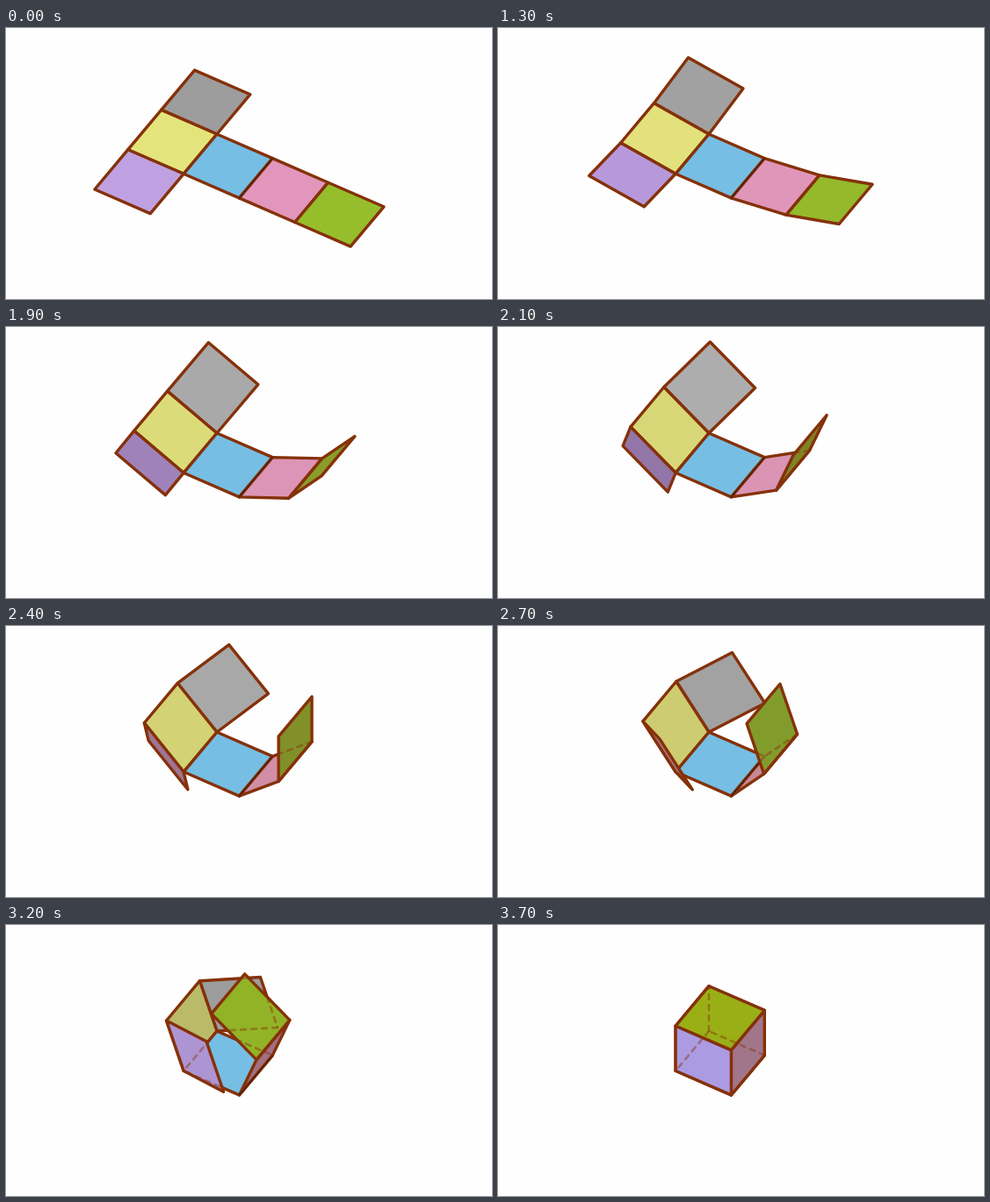
These frames come from a looping animation (553 px wide and 309 px high, 5 s). An HTML page with a canvas:

```html
<!DOCTYPE html>
<html lang="en">
<head>
<meta charset="utf-8">
<title>Folding cube net</title>
<style>
  html, body { margin: 0; width: 100%; height: 100%; overflow: hidden; background: #fefefe; }
  canvas { display: block; }
</style>
</head>
<body>
<canvas id="stage" width="553" height="309"></canvas>
<script>
const ctx = document.getElementById('stage').getContext('2d');
const LOOP = 5000;
const STEPS = [1300, 1700, 1900, 2100, 2400, 2700, 2900, 3200, 3400, 3700];
const EDGE = '#85310a';

// Projected cube axes and the back corner of the base
const U = [63.3, 27.6], V = [-37.9, 45.3], W = [0, -51.3];
const A = [240, 121];

// Face colours keyed by fold step, blended in between
const COLORS = {
  gray:   { 0: '9d9d9d', 2: 'a5a5a5', 4: 'adadad', 6: 'a2a2a2', 10: '989898' },
  yellow: { 0: 'e4e47c', 2: 'e0de7b', 4: 'd8d778', 6: 'cecc70', 8: 'babb6a', 10: 'a8a860' },
  blue:   { 0: '76bee3' },
  pink:   { 0: 'e296bb', 4: 'da94b4', 6: 'c88898', 8: 'a27080', 10: 'a2768a' },
  purple: { 0: 'bfa1e2', 1: 'b798da', 2: 'ac8ecd', 4: '9376a8', 6: 'aa7480', 8: 'ad94d2', 10: 'ab9be2' },
  green:  { 0: '96be2c', 2: '92b62c', 4: '7f8424', 6: '829c2c', 8: '92b326', 10: '9aaf16' }
};

const add = (p, q) => [p[0] + q[0], p[1] + q[1]];
const mix = (p, a, q, b) => [p[0] * a + q[0] * b, p[1] * a + q[1] * b];
const quad = (p, q, d) => [p, q, add(q, d), add(p, d)];
const rgb = hex => [0, 2, 4].map(i => parseInt(hex.substr(i, 2), 16));

function colorAt(name, step) {
  const keys = COLORS[name];
  const marks = Object.keys(keys).map(Number);
  const lo = Math.max(...marks.filter(k => k <= step));
  const hi = Math.min(...marks.filter(k => k >= step), Infinity);
  const from = rgb(keys[lo]);
  if (hi === Infinity || hi === lo) return `rgb(${from})`;
  const t = (step - lo) / (hi - lo);
  const to = rgb(keys[hi]);
  return `rgb(${from.map((c, i) => Math.round(c + (to[i] - c) * t))})`;
}

// Every hinge turns by the same angle
function faces(angle) {
  const c = Math.cos(angle), s = Math.sin(angle);
  const B = add(A, U), D = add(A, V), C = add(B, V);
  const out = mix(U, -c, W, s);
  const inward = mix(U, s, W, c);
  const wall = mix(U, c, W, s);
  const lid = mix(U, Math.cos(2 * angle), W, Math.sin(2 * angle));
  return [
    ['gray', quad(A, add(A, out), mix(V, -c, inward, s))],
    ['yellow', quad(A, D, out)],
    ['blue', [A, B, C, D]],
    ['pink', quad(B, C, wall)],
    ['purple', quad(D, add(D, out), mix(V, c, inward, s))],
    ['green', quad(add(B, wall), add(C, wall), lid)]
  ];
}

function trace(points) {
  ctx.beginPath();
  points.forEach(p => ctx.lineTo(p[0], p[1]));
  ctx.closePath();
}

// Edges lying behind a face show through it as faint dashes
function drawHidden(face, behind) {
  ctx.save();
  trace(face);
  ctx.clip();
  ctx.globalAlpha = 0.45;
  ctx.lineWidth = 2.6;
  ctx.setLineDash([6, 6]);
  const seen = new Set();
  behind.forEach(points => points.forEach((p, i) => {
    const q = points[(i + 1) % 4];
    const key = [p, q].map(v => v.map(Math.round).join()).sort().join('|');
    if (seen.has(key)) return;
    seen.add(key);
    ctx.beginPath();
    ctx.moveTo(...p);
    ctx.lineTo(...q);
    ctx.stroke();
  }));
  ctx.restore();
}

function draw(step) {
  ctx.fillStyle = '#fefefe';
  ctx.fillRect(0, 0, 553, 309);
  ctx.strokeStyle = EDGE;
  ctx.lineWidth = 3.4;
  ctx.lineJoin = ctx.lineCap = 'round';
  const behind = [];
  for (const [name, points] of faces(step * Math.PI / 20)) {
    trace(points);
    ctx.fillStyle = colorAt(name, step);
    ctx.fill();
    drawHidden(points, behind);
    trace(points);
    ctx.stroke();
    if (name === 'pink' && step < 9) darkHinge(points[0], points[1]);
    behind.push(points);
  }
}

function darkHinge(p, q) {
  ctx.save();
  ctx.strokeStyle = '#2c1608';
  ctx.lineWidth = 1.3;
  ctx.lineCap = 'butt';
  ctx.setLineDash([2, 1]);
  ctx.beginPath();
  ctx.moveTo(...p);
  ctx.lineTo(...q);
  ctx.stroke();
  ctx.restore();
}

const start = performance.now();
let shown = -1;

function tick() {
  const t = (performance.now() - start) % LOOP;
  const step = STEPS.filter(at => at <= t).length;
  if (step !== shown) draw(shown = step);
  requestAnimationFrame(tick);
}
tick();
</script>
</body>
</html>
```
